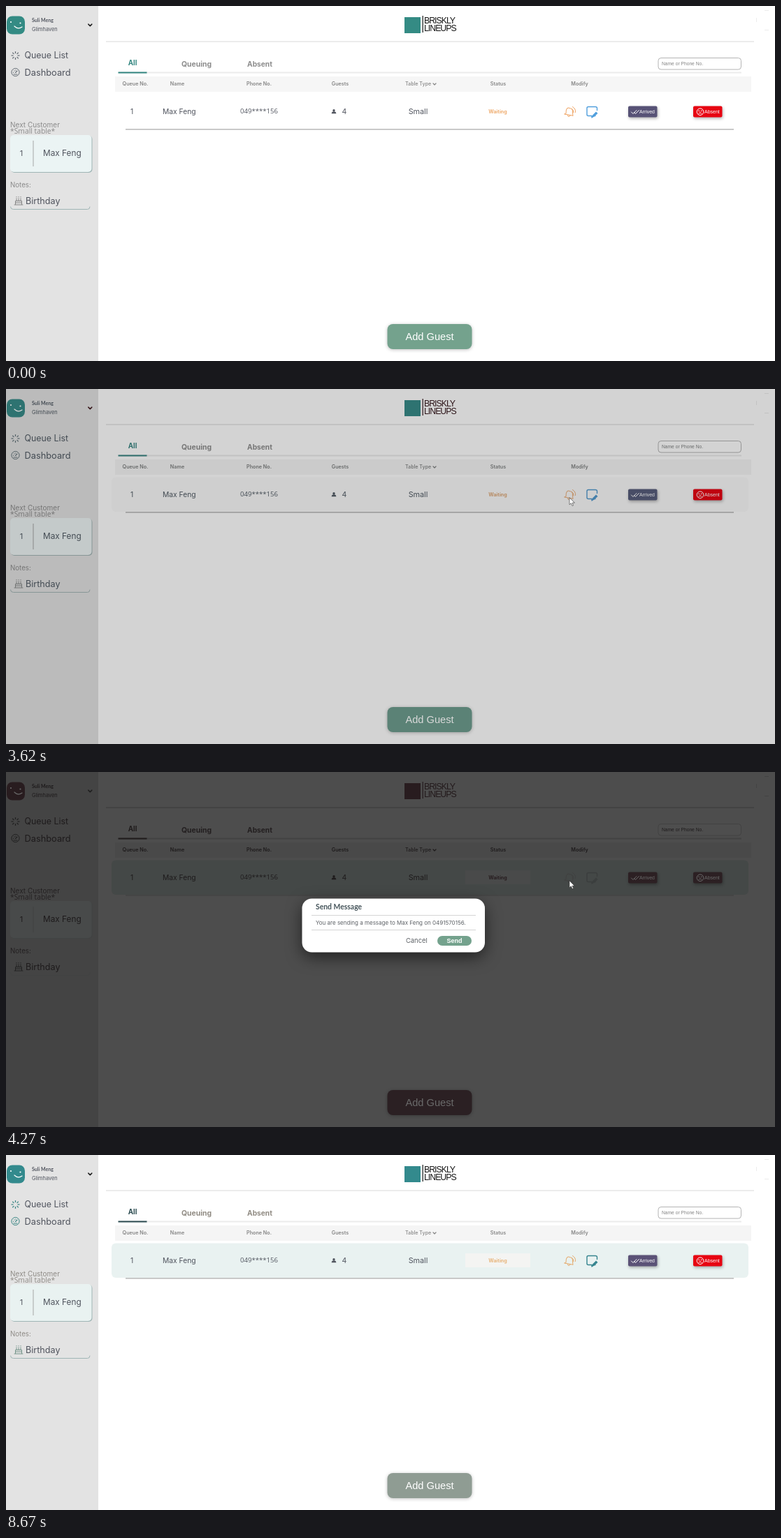
Write an HTML page with a canvas that moves like this. It is 1100 by 509 pixels and loops after 9890 ms.

```html
<!DOCTYPE html>
<html lang="en">
<head>
<meta charset="utf-8">
<title>Queue list</title>
<style>
  html, body { margin: 0; width: 100%; height: 100%; overflow: hidden; background: #fff; }
  canvas { display: block; }
</style>
</head>
<body>
<canvas id="stage" width="1100" height="509"></canvas>
<script>
const c = document.getElementById('stage').getContext('2d');
const LOOP = 9890;
const SANS = 'Inter, sans-serif';
const OPEN = '"Open Sans", sans-serif';
const ARIAL = '"Liberation Sans", sans-serif';
const LATO = 'Lato, sans-serif';
const GUEST = 'Max Feng';

// Each colour: lit, half dimmed, fully dimmed, lit again
const palette = {
  page:    ['#ffffff', '#797979', '#4d4d4d', '#ffffff'],
  side:    ['#e3e3e3', '#6b6b6b', '#444444', '#e3e3e3'],
  card:    ['#ebf4f4', '#757575', '#484a4a', '#e9f2f1'],
  edge:    ['#9fb5b5', '#565656', '#414343', '#9fb5b5'],
  rule:    ['#a6a6a6', '#4c4c4c', '#414141', '#a6a6a6'],
  faint:   ['#ececec', '#6e6e6e', '#434343', '#ececec'],
  strip:   ['#f6f6f6', '#737373', '#494949', '#f5f5f5'],
  row:     ['#ffffff', '#6f6f6f', '#444847', '#e9f2f1'],
  pill:    ['#ffffff', '#6f6f6f', '#494a4a', '#f4f4f2'],
  text:    ['#50545e', '#283a3d', '#1e1b1c', '#50545e'],
  note:    ['#8b8b8b', '#474747', '#242122', '#8f8c87'],
  head:    ['#858585', '#303636', '#1e1b1c', '#858585'],
  tab:     ['#8d8d8d', '#484848', '#231f20', '#918c84'],
  active:  ['#338680', '#263f43', '#201c1c', '#2b4b50'],
  brand:   ['#348b84', '#23434a', '#281c1f', '#338a8d'],
  icon:    ['#656d75', '#30484a', '#202020', '#3c8785'],
  cake:    ['#858585', '#474d4d', '#222222', '#74948a'],
  logo:    ['#151515', '#5e1420', '#231a1c', '#151515'],
  arrow:   ['#202020', '#6a0c18', '#202020', '#202020'],
  wait:    ['#efae72', '#454545', '#281e20', '#e8b57c'],
  bell:    ['#efa566', '#676767', '#404141', '#e5ab6e'],
  edit:    ['#519fdd', '#2b3d41', '#3b3e3e', '#36858f'],
  arrived: ['#575276', '#2b4247', '#2c2023', '#5b5277'],
  absent:  ['#e70512', '#6f0008', '#2c2023', '#e70512'],
  add:     ['#74a28d', '#294147', '#2b2023', '#8f9c93'],
  label:   ['#ffffff', '#8c8c8c', '#6a6a6a', '#ffffff'],
  input:   ['#ffffff', '#797979', '#4e4e4e', '#ffffff'],
  border:  ['#b4b4b4', '#525252', '#424242', '#b4b4b4'],
};

const dimSteps = [[0, 0], [3530, .33], [3640, .67], [3750, 1], [3910, 1.5], [4000, 2], [7540, 3]];
const modalSteps = [[0], [4150, 156], [4270, 182], [4370, 205], [4510, 220], [7540]];
const tipSteps = [[0, 0], [870, .2], [1000, .4], [1120, .6], [1250, .75], [1380, .9], [1500, 1], [3530, 0]];
// time, x, y, hand
const cursorSteps = [
  [0], [130, 868, 324], [240, 781, 227], [350, 763, 190], [510, 790, 171], [610, 803, 160],
  [720, 802, 156, 1], [3530, 806, 156], [4640, 778, 176], [4760, 735, 214], [4880, 690, 252],
  [5000, 662, 273], [5130, 650, 279, 1], [7420, 636, 281], [8380, 881, 402], [8540, 980, 497], [8670],
];

const at = (steps, t) => steps.findLast(s => s[0] <= t);
const rgb = h => [1, 3, 5].map(i => parseInt(h.slice(i, i + 2), 16));
function mix(a, b, f) {
  const p = rgb(a), q = rgb(b);
  return `rgb(${p.map((v, i) => Math.round(v + (q[i] - v) * f))})`;
}

let dim = 0;
function tone(name) {
  const p = palette[name], i = Math.floor(dim);
  return mix(p[i], p[Math.min(i + 1, 3)], dim - i);
}

// y is the middle of the capitals
function text(s, x, y, size, color, { weight = 400, font = SANS, align = 'left', gap = 0 } = {}) {
  c.font = `${weight} ${size}px ${font}`;
  c.textAlign = align;
  c.letterSpacing = gap + 'px';
  c.fillStyle = color;
  c.fillText(s, x, y + size * .36);
}
function box(x, y, w, h, r, fill, stroke) {
  c.beginPath();
  c.roundRect(x, y, w, h, r);
  if (fill) { c.fillStyle = fill; c.fill(); }
  if (stroke) { c.strokeStyle = stroke; c.lineWidth = 1; c.stroke(); }
}
function raised(draw, color = 'rgba(0,0,0,.3)', blur = 4, dx = 1, dy = 2) {
  c.save();
  c.shadowColor = color;
  c.shadowBlur = blur;
  c.shadowOffsetX = dx;
  c.shadowOffsetY = dy;
  draw();
  c.restore();
}
function path(d, x, y, stroke, width = 1, fill, turn = 0) {
  c.save();
  c.translate(x, y);
  c.rotate(turn);
  c.lineCap = c.lineJoin = 'round';
  const p = new Path2D(d);
  if (fill) { c.fillStyle = fill; c.fill(p); }
  if (stroke) { c.strokeStyle = stroke; c.lineWidth = width; c.stroke(p); }
  c.restore();
}
function dot(x, y, r, fill, stroke) {
  c.beginPath();
  c.arc(x, y, r, 0, 7);
  if (fill) { c.fillStyle = fill; c.fill(); }
  if (stroke) { c.strokeStyle = stroke; c.lineWidth = 1; c.stroke(); }
}
function bar(x, y, w, h, color) {
  c.fillStyle = color;
  c.fillRect(x, y, w, h);
}

function sidebar() {
  const ink = tone('text'), icon = tone('icon'), note = tone('note'), cake = tone('cake');
  bar(0, 0, 132, 509, tone('side'));
  box(1, 14.5, 26, 26, 8, tone('brand'));
  dot(7, 23, 1.1, tone('label'));
  dot(20.5, 24.5, 1.1, tone('label'));
  path('M0 0Q5 5 11 1', 12, 29, tone('label'), 1.2);
  text('Suli Meng', 37, 20.5, 7, ink, { weight: 700, font: LATO });
  text('Glimhaven', 37, 33, 7.4, ink);
  path('M-2.5-1.2L0 1.3L2.5-1.2', 120.3, 27.3, tone('arrow'), 1.5);

  for (let i = 0; i < 8; i++) {
    c.save();
    c.translate(13.5, 71);
    c.rotate(i * Math.PI / 4);
    bar(3, -.6, 3, 1.2, icon);
    c.restore();
  }
  dot(13.5, 95, 5.6, null, icon);
  path('M0 0L2.5-2.5M-3 0h.3M-2-2.5h.3M0-3.5h.3M-2.5 2.5h5', 13.5, 95.5, icon, 1.1);
  text('Queue List', 26.5, 71, 12.4, ink);
  text('Dashboard', 26.5, 95, 12.8, ink);

  text('Next Customer', 6, 170, 10, note);
  text('*Small table*', 6, 179.5, 10.3, note, { font: OPEN });
  box(7, 186, 116.5, 53, 5, tone('edge'));
  box(6, 185, 116.5, 53, 5, tone('card'));
  bar(38.5, 193, 1, 37, tone('rule'));
  text('1', 22, 211, 11, ink, { align: 'center' });
  text(GUEST, 53, 211, 11.8, ink);

  text('Notes:', 6, 257, 9.7, note);
  path('M0 0Q0 3.5 4 3.5H110Q113.5 3.5 113.5 0', 6.5, 288, tone('edge'), 1);
  path('M0 12.5H12M1.5 12V7H10.5V12M1.5 9.5H10.5M3 6V3.5M6 6V3.5M9 6V3.5M3 1.5V1M6 1.5V1M9 1.5V1', 12, 272.5, cake, 1);
  text('Birthday', 28, 279, 12.6, ink);
}

function header() {
  const logo = tone('logo'), type = { font: ARIAL, gap: -1 };
  box(570, 16, 23, 23, 0, tone('brand'));
  bar(595.6, 14, 1.2, 24, logo);
  text('BRISKLY', 598, 21, 12.3, logo, type);
  text('LINEUPS', 598, 31.5, 12.3, logo, type);
  bar(143, 50, 927, 2, tone('faint'));
  bar(1085, 6, 6, 1, tone('faint'));
  bar(1085, 34, 6, 1, tone('faint'));
  bar(1073, 17, 1, 6, tone('faint'));

  const bold = { weight: 700, align: 'center' };
  bar(161, 94.5, 891, 2, tone('faint'));
  bar(160.5, 94.5, 41, 2, tone('active'));
  text('All', 181, 81, 9.8, tone('active'), bold);
  text('Queuing', 272.5, 83, 10.4, tone('tab'), bold);
  text('Absent', 363, 83, 10.2, tone('tab'), bold);
  box(933, 74.5, 118.5, 16.5, 4, tone('input'), tone('border'));
  text('Name or Phone No.', 938, 83, 6.7, tone('head'), { font: ARIAL });

  bar(156, 101, 910, 22, tone('strip'));
  const heads = { 'Queue No.': 185, Name: 245, 'Phone No.': 362, Guests: 478, Status: 704, Modify: 820.5 };
  for (const h in heads) text(h, heads[h], 111.5, 7.2, tone('head'), { weight: 600, align: 'center' });
  text('Table Type', 571, 111.5, 7.1, tone('head'), { weight: 500 });
  path('M-2-1L0 1L2-1', 613, 112, tone('head'), 1.2);
}

function guestRow(t) {
  const ink = tone('text'), mid = { align: 'center' };
  box(151, 126.5, 911, 49.5, 6, tone('row'));
  bar(657, 141, 93, 20, tone('pill'));
  bar(171, 176.3, 870, 1.2, tone('rule'));
  if (t >= 510 && t < 3530) {
    dot(156, 151.5, 4.8, null, '#f1d65c');
    path('M0 0V2M0-2V-1.8', 156, 151.5, '#f1d65c');
  }
  text('1', 180, 151, 10.3, ink, mid);
  text(GUEST, 224, 151, 10.3, ink);
  text('049****156', 362, 151, 9.6, ink, { font: OPEN, align: 'center' });
  dot(469, 149.7, 1.7, ink);
  path('M-3.3 3Q-3.3 0 0 0T3.3 3Z', 469, 151.3, null, 0, ink);
  text('4', 484, 151, 10.5, ink, mid);
  text('Small', 589.5, 151, 10.8, ink, mid);
  text('Waiting', 703.5, 151.3, 7.1, tone('wait'), { weight: 700, align: 'center' });

  path('M-6 4L-4 2.5L-4.8-2Q-4.5-7 0-6Q4-7 4.8-1L6.5 3.2ZM-1 4.5Q1 7.5 2.5 4', 805.5, 152.5, tone('bell'), 1, null, .25);
  path('M0-4Q3-2 2.5 1.5M1-7Q6-4 5 1', 809.5, 151.5, tone('bell'));
  path('M5 6H3L0 8.5V6H-5Q-7 6-7 4V-5Q-7-7-5-7H5Q7.5-7 7.5-5V-2', 838, 151.5, tone('edit'), 1.4);
  path('M0 8L1 5L6 0L8.5 2.5L3 7.5Z', 838, 151.5, null, 0, tone('edit'));

  const small = { font: ARIAL };
  raised(() => box(890, 143.5, 41.5, 16, 2, tone('arrived')));
  path('M0 0L2.5 2.5L7.5-2.5M4 .5L6 2.5L11-2.5', 894.5, 152, tone('label'), 1);
  text('Arrived', 906, 151.7, 6.95, tone('label'), small);
  raised(() => box(983, 143.5, 41.5, 16, 2, tone('absent')));
  dot(993, 151.7, 4.8, null, tone('label'));
  path('M-2.2 2.8Q0 0 2.2 2.8M-2.5-1.5L-1-.8M2.5-1.5L1-.8', 993, 151.5, tone('label'), 1);
  text('Absent', 999, 151.7, 7, tone('label'), small);

  raised(() => box(545.5, 456, 121, 36, 8, tone('add')), 'rgba(0,0,0,.25)', 5, 0, 1);
  text('Add Guest', 606, 474, 14.6, tone('label'), { font: ARIAL, align: 'center' });
}

function tooltip(t) {
  c.globalAlpha = at(tipSteps, t)[1];
  if (c.globalAlpha) {
    raised(() => box(797.5, 124, 15, 13, 4, '#fff'));
    raised(() => box(791, 110, 28.5, 19, 3, '#fff'));
    text('Notify', 805, 120, 5.9, '#555555', { align: 'center' });
  }
  c.globalAlpha = 1;
  if (t >= 3350 && t < 3530) dot(805, 156, 9, '#f6e34a');
}

function modal(t) {
  const y = at(modalSteps, t)[1];
  if (!y) return;
  const hover = t >= 5130, grow = hover ? 2 : 0;
  raised(() => box(423.5, y - .5, 261.5, 77, 14, '#fff'), 'rgba(0,0,0,.55)', 22, 0, 7);
  text('Send Message', 443, y + 11.3, 10.4, '#45545a', { weight: 700, font: LATO });
  bar(437, y + 23, 235, 1, '#d4d4d4');
  bar(437, y + 44, 235, 1, '#d4d4d4');
  text(`You are sending a message to ${GUEST} on 0491570156.`, 443, y + 34, 8, '#5d6166');
  text('Cancel', 572, y + 60, 9.4, '#5d6166');
  const pulse = hover ? .5 + .5 * Math.cos((t - 5130) / 654 * Math.PI * 2) : 0;
  box(617 - grow, y + 53 - grow / 2, 49 + grow * 2, 14 + grow, 8, mix('#74a28d', '#7e988d', pulse));
  text('Send', 641.5, y + 60.2, hover ? 9.8 : 9, '#ffffff', { weight: hover ? 400 : 700, font: ARIAL, align: 'center' });
}

function cursor(t) {
  const [, x, y, hand] = at(cursorSteps, t);
  if (x === undefined) return;
  if (hand) path('M3 8V1.5Q4 0 5 1.5V6Q7 5 7.5 6.5Q9 6 9.3 7.2Q10.8 7 10.8 8.5V11L9.5 14H4.5L.5 9Q1 7 3 9Z', x, y, '#222', .9, '#fff');
  else path('M0 0V9.8L2.3 7.7L4 11.5L5.6 10.8L4 7.2H7Z', x, y, '#333', .6, '#fff');
}

function frame(now) {
  const t = now % LOOP;
  dim = at(dimSteps, t)[1];
  bar(0, 0, 1100, 509, tone('page'));
  sidebar();
  header();
  guestRow(t);
  tooltip(t);
  modal(t);
  cursor(t);
  requestAnimationFrame(frame);
}
requestAnimationFrame(frame);
</script>
</body>
</html>
```
